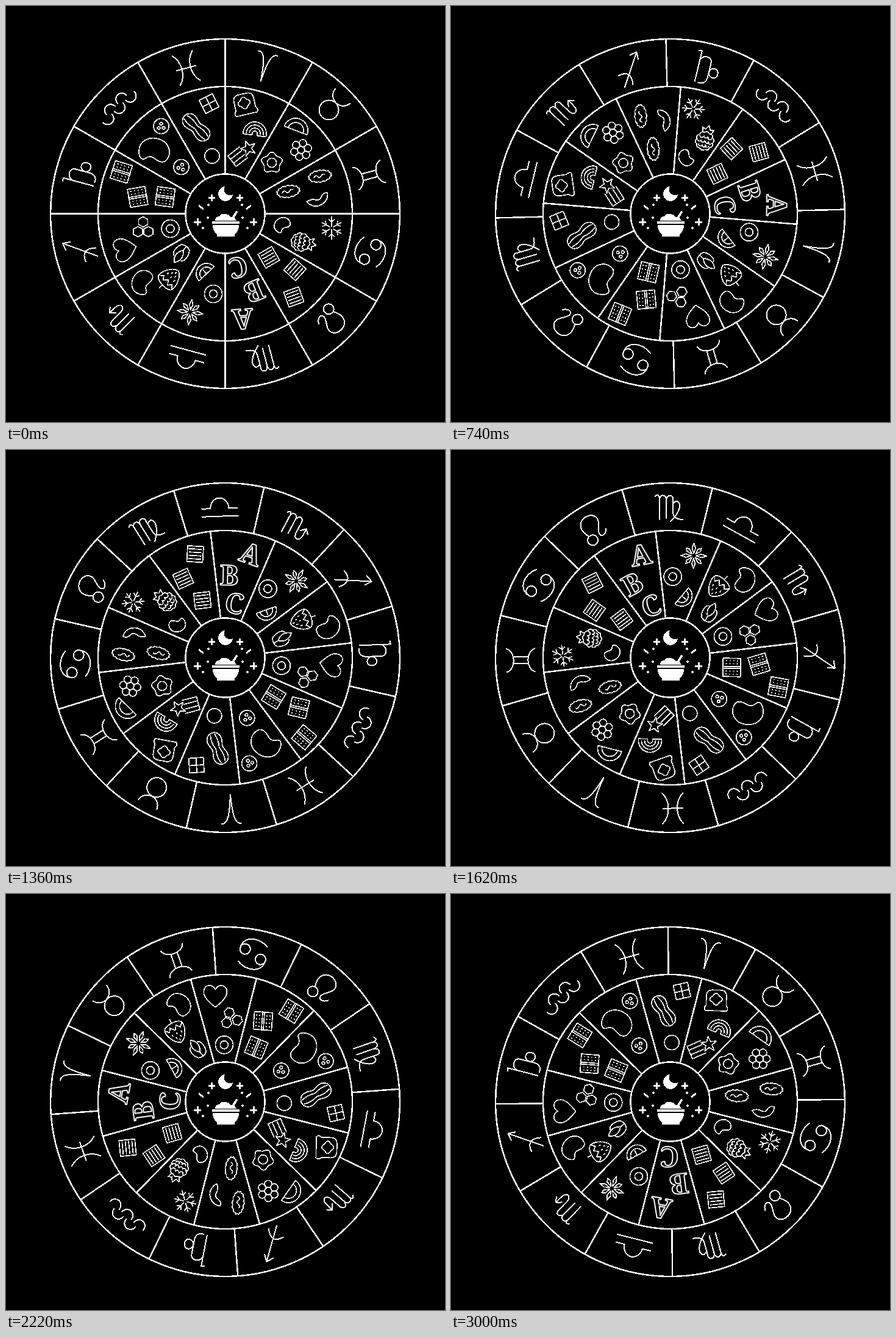
Recreate the animation shown at these times as an HTML page. Size 720 by 682 pixels, loop 3.02 s.

```html
<!DOCTYPE html>
<html>
<head>
<meta charset="utf-8">
<style>
html, body { margin: 0; width: 100%; height: 100%; overflow: hidden; background: #000; }
svg { display: block; width: 100vw; height: 100vh; shape-rendering: crispEdges; }
path, text { vector-effect: non-scaling-stroke; }
g { fill: none; stroke: #fff; stroke-width: 1.7; stroke-linecap: round; stroke-linejoin: round; }
#outer { stroke-width: 2; }
.line { stroke-width: 2.5; }
.solid { fill: #fff; stroke: none; }
text { font: bold 46px "Noto Serif", "Liberation Serif", serif; text-anchor: middle; stroke-width: 2; }
</style>
</head>
<body>
<svg viewBox="0 0 720 682">
  <g transform="translate(359.5 340.5)">
    <g id="outer"></g>
    <g id="inner"></g>
    <g class="line"><circle r="286.5"/><circle r="208.5"/><circle r="65"/></g>
  </g>
  <g id="hub"></g>
</svg>
<script>
const CX = 359.5, CY = 340.5, LOOP = 3020;
const $ = id => document.getElementById(id);
const range = (n, f) => Array.from({ length: n }, (_, i) => f(i));
const many = (n, f) => range(n, f).join('');

// path helpers
const ring = (x, y, r) => `M${x - r} ${y}a${r} ${r} 0 1 0 ${2 * r} 0a${r} ${r} 0 1 0 ${-2 * r} 0`;
const polar = (a, r, x = 0, y = 0) =>
  `${(x + r * Math.sin(a)).toFixed(1)} ${(y - r * Math.cos(a)).toFixed(1)}`;
const loop = (n, point) => 'M' + range(n, point).join('L') + 'Z';
const wavy = (rx, ry, amp, n, y = 0) => loop(n * 8, i => {
  const a = i * Math.PI / n / 4, k = 1 + amp * Math.cos(a * n);
  return `${(rx * k * Math.sin(a)).toFixed(1)} ${(y - ry * k * Math.cos(a)).toFixed(1)}`;
});
const hex = (x, y, r) => loop(6, i => polar(i * Math.PI / 3, r, x, y));
const box = (w, h) => `M${-w / 2} ${-h / 2}h${w}v${h}h${-w}Z`;
const arch = (r, y = 0) => `M${-r} ${y}A${r} ${r} 0 0 1 ${r} ${y}`;
const dot = (x, y) => `M${x} ${y}h.8`;

// zodiac signs, clockwise from the top
const signs = [
  'M-16-29C-5-31-2-10 0 18C2-10 5-31 16-29',
  ring(0, 2.5, 16) + 'M-17-29C-14-9 14-9 17-29',
  'M-19-25C-14-10 14-10 19-25M-19 21C-14 6 14 6 19 21M-5-14V10M6-14V10',
  ring(-15, -9, 8.5) + ring(13, 3, 8.5) + 'M-23-10C-22-30 4-33 20-19M21 4C20 24-6 27-22 13',
  ring(-9.5, 12.5, 8.5) + 'M-12 4C-16-4-17-10-16-14C-14-24-4-27 2-26C12-25 17-17 14-9C11-2 5 4 5 9C5 16 14 16 19 7',
  'M-20-22Q-14-28-13-18V16M-13-18Q-10-26-4-22Q-2-20-2-16V14M-2-16Q0-25 7-22Q10-20 9-14V6Q9 16 25 17M9-10Q17-17 20-8Q21 4 4 20',
  'M-29 11H30M-29-2H-15A15 17 0 0 1 15-2H29',
  'M-21-16Q-16-22-15-14V17M-15-14Q-12-21-7-18Q-4-17-4-12V15M-4-12Q-1-20 4-18Q7-16 7-12V8Q8 17 14 16Q20 15 19-5M12 1L19-6L25 1',
  'M-13 23L22-27M10-25L22-27L21-15M-17 2Q6-2 1 23',
  'M-17-28L-12-29V22M-12-14Q-8-22 0-21Q8-20 7-10V10C7 20 2 24-6 23M7 3C8-8 22-8 22 3C22 13 9 13 7 3',
  many(5, i => i % 2 ? `M${13 * i - 36}-9a10 10.5 0 0 1 20 0` : `M${13 * i - 36}-4a10 10.5 0 0 0 20 0`),
  'M-17-29C-4-16-4 8-17 21M17-29C4-16 4 8 17 21M-16-4H16'
];

const berrySpots = [[-7, -2], [0, -3], [7, -2], [-9, 5], [-3, 5], [4, 5], [9, 5], [-5, 12], [1, 12], [6, 11]];
const seeds = [[-8, 4], [0, 4], [8, 4], [-4, 10], [4, 10], [0, 15]];

const shapes = {
  toast: 'M-17 17Q-21 13-16 8V-7Q-16-17-6-17H7Q17-17 17-7V8Q21 13 18 17Z' + wavy(9, 8.5, .14, 4, -2),
  rainbow: 'M-19 3V0A19 19 0 0 1 19 0V3H4V0A4 4 0 0 0-4 0V3Z' + arch(14) + arch(9),
  comet: loop(10, i => polar(i * Math.PI / 5, i % 2 ? 5.5 : 13, 0, -12)) +
    'M-11-2V22H11V-2M-4-1V22M4-1V22',
  melon: arch(20) + 'Z' + arch(13),
  flower: wavy(15.5, 15.5, .13, 5) + ring(0, 0, 7.5),
  cluster: ring(0, 0, 6) + many(6, i => ring(11.5 * Math.sin(i * Math.PI / 3), 11.5 * Math.cos(i * Math.PI / 3), 6)),
  flake: wavy(18.5, 9.5, .05, 14) + 'M-10 1q3-5 6-1t6 0t6-2',
  swoosh: 'M-18 6Q-14-8 2-8Q14-7 19 6Q10 8 4 3Q-2-1-6 4Q-12 10-18 6Z',
  bean: 'M-14 3C-16-8-6-13 2-12C12-11 17-2 13 6C10 11 4 8 0 6C-3 5-5 6-7 8C-10 11-13 8-14 3Z',
  berry: wavy(14.5, 15, .05, 10, 5) + berrySpots.map(([x, y]) => `M${x - 3} ${y}a3 3 0 0 0 6 0`).join('') +
    'M-7-9L-10-16L-4-14L0-21L4-14L10-16L7-9',
  snow: many(6, i => {
    const a = i * Math.PI / 3;
    return `M${polar(a, 3)}L${polar(a, 18)}M${polar(a - .32, 15)}L${polar(a, 10)}L${polar(a + .32, 15)}`;
  }),
  stripes: box(26, 26) + many(4, i => `M-10 ${i * 5.4 - 8}H10`),
  donut: ring(0, 0, 14.5) + ring(0, 0, 6.5),
  slice: arch(17) + 'Z' + arch(11) + 'M0 0V-9',
  anise: many(8, i => {
    const a = i * Math.PI / 4, r = i % 2 ? 18 : 21;
    return `M${polar(a, 4)}L${polar(a - .22, 13)}L${polar(a, r)}L${polar(a + .22, 13)}Z`;
  }),
  bud: 'M0-17C8-8 7 0 0 8C-7 0-8-8 0-17ZM-7-8C-13-6-13 6-8 14Q0 19 8 14C13 6 13-6 7-8M0 8V16',
  strawberry: 'M-16-8C-18 2-10 18 0 21C10 18 18 2 16-8C12-16-12-16-16-8ZM-16-8L-10-2L-6-8L0-1L5-8L10-2L16-8M0-14V-21' +
    seeds.map(([x, y]) => `M${x} ${y}v2`).join(''),
  honey: hex(0, -8, 8.5) + hex(-8.5, 8, 8.5) + hex(8.5, 8, 8.5),
  heart: 'M0 19C-10 11-19 3-19-6C-19-19-4-20 0-10C4-20 19-19 19-6C19 3 10 11 0 19Z',
  cracker: box(29, 30) + 'M-15-1.5H15M-15 1.5H15' +
    [-11, -6, 6, 11].map(y => many(4, i => dot(i * 6 - 9.4, y))).join(''),
  coin: ring(0, 0, 12.5) + ring(0, -4, 2.3) + ring(-4, 3, 2.3) + ring(4, 3, 2.3),
  pane: box(24, 24) + 'M-12 0H12M0-12V12',
  peanut: 'M-15-12C-6-12-6-9 0-9S6-12 15-12C31-11 31 11 15 12C6 12 6 9 0 9S-6 12-15 12C-31 11-31-11-15-12Z' +
    'M-24-3Q-13-7 0-3Q13-7 24-3M-24 4Q-13 7 0 3Q13 7 24 4',
  ball: ring(0, 0, 12)
};

// name, x, y, turn, scale
const items = [
  ['toast', 391, 161, -13], ['rainbow', 408, 209, 8], ['comet', 388, 241, 52],
  ['melon', 475, 204, 21], ['flower', 436, 257, 0], ['cluster', 484, 236, 15],
  ['flake', 515, 279, -9], ['flake', 463, 304, -9], ['swoosh', 513, 319, 157],
  ['bean', 453, 359, -35, .95], ['berry', 488, 388, 102], ['snow', 534, 364, 0],
  ['stripes', 431, 412, -30], ['stripes', 474, 432, -48], ['stripes', 472, 477, -20],
  ['C', 381, 428, 167], ['B', 407, 467, 158], ['A', 388, 513, 176],
  ['slice', 329, 439, -43], ['donut', 340, 472, 0], ['anise', 302, 502, 8],
  ['bud', 286, 407, -143], ['strawberry', 267, 448, -132], ['bean', 224, 453, -65, 1.4],
  ['honey', 225, 362, 0], ['donut', 269.5, 365, 0], ['heart', 195, 399, -104],
  ['cracker', 189, 272, 17], ['cracker', 216, 313, -10], ['cracker', 261, 313, 8],
  ['coin', 254.5, 197, 0], ['coin', 287.5, 264, 20], ['bean', 243, 238, 10, 1.75],
  ['pane', 333, 160, -27], ['peanut', 312, 199, 45], ['ball', 338, 246, 0]
];

const spokes = (from, to) =>
  `<path class="line" d="${many(12, i => `M${polar(i * Math.PI / 6, from)}L${polar(i * Math.PI / 6, to)}`)}"/>`;

$('outer').innerHTML = spokes(209, 286) + signs.map((d, i) =>
  `<path transform="rotate(${15 + 30 * i}) translate(0 -243)" d="${d}"/>`).join('');

$('inner').innerHTML = spokes(65, 208) + items.map(([name, x, y, turn, size = 1]) => {
  const place = `transform="translate(${x - CX} ${y - CY}) rotate(${turn}) scale(${size})"`;
  return shapes[name] ? `<path ${place} d="${shapes[name]}"/>` : `<text ${place} y="16">${name}</text>`;
}).join('');

const cross = (x, y, r) => `M${x - r} ${y}h${2 * r}M${x} ${y - r}v${2 * r}`;
const sparks = [[332, 326], [387, 326], [331, 347], [388, 347], [323, 364], [396, 364]];
$('hub').innerHTML =
  `<path stroke-width="3" stroke-linecap="butt" d="${cross(337, 314, 5.5) + cross(383, 314, 5.5) +
    cross(314, 354, 6) + cross(406, 354, 6)}M316 327L324 333M402 327L394 333"/>
  <path class="solid" d="M359 296A12 12 0 1 0 372 309A9.5 9.5 0 0 1 359 296Z
    M343 352Q343 345 350 345Q353 339 359 341Q365 341 368 346L375 347L378 352Z
    M338 353H383V357H338ZM339 359H382Q382 370 375 374V378H346V374Q339 370 339 359Z"/>
  <path stroke-width="3.5" d="M371 349L378 338"/>
  <path class="solid" d="${sparks.map(([x, y]) => ring(x, y, 1.8)).join('')}"/>`;

function draw(now) {
  const t = Math.floor(now % LOOP / 20) * 20;
  $('outer').setAttribute('transform', `rotate(${t * .11975})`);
  $('inner').setAttribute('transform', `rotate(${t * -.1152})`);
  requestAnimationFrame(draw);
}
draw(performance.now());
</script>
</body>
</html>
```
